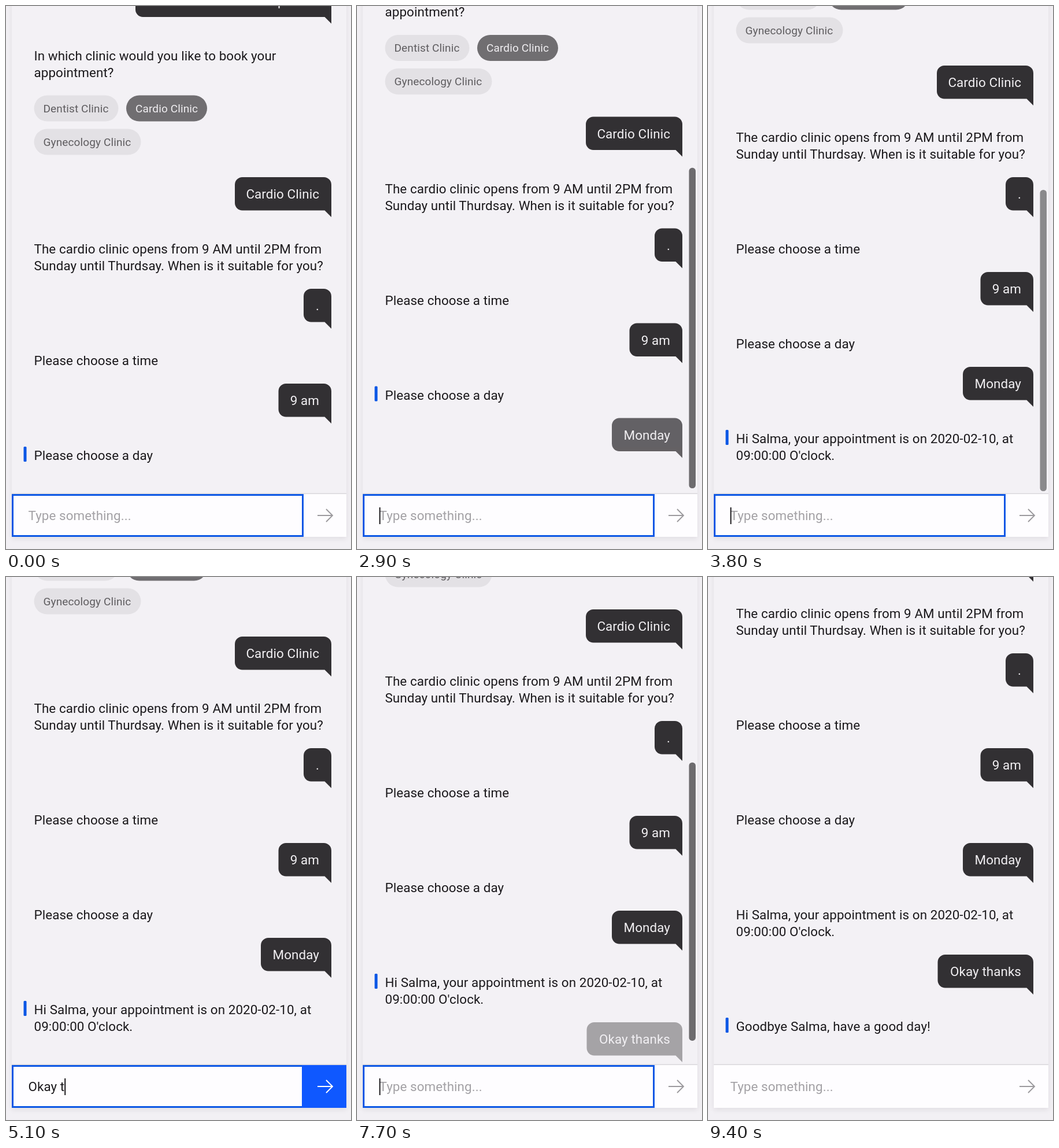
An HTML page for the animation above (10000 ms loop, 597 by 939 pixels).

```html
<!DOCTYPE html>
<html lang="en">
<head>
<meta charset="utf-8">
<title>Clinic chat</title>
<style>
  html, body { margin: 0; width: 100%; height: 100%; overflow: hidden; background: #f2f0f4; }
  .panel { position: absolute; left: 10px; top: -30px; width: 579px; height: 948px;
    background: #f3f1f5; box-shadow: 0 3px 9px rgba(40, 36, 46, .09); }
  svg { position: absolute; left: 0; top: 0; display: block; }
  text { font: 22.4px Roboto, sans-serif; letter-spacing: .08px; fill: #1b191c; white-space: pre; }
  .said { fill: #f1eff2; }
  .chip { font-size: 19px; letter-spacing: .12px; fill: #5f5d60; }
  .chip.on { fill: #f1eff2; }
  .hint { fill: #a3a1a5; }
</style>
</head>
<body>
<div class="panel"></div>
<svg id="stage" width="597" height="939" viewBox="0 0 597 939">
  <defs><clipPath id="view"><rect x="10" y="0" width="579" height="843"/></clipPath></defs>
  <g clip-path="url(#view)">
    <g id="log"></g>
    <rect id="thumb" x="574.5" width="11.5" rx="5.5" fill="#6d6b6e"/>
  </g>
  <rect x="10" y="844" width="579" height="74" fill="#fefdff"/>
  <rect x="10" y="842.5" width="579" height="1.5" fill="#dad8dc"/>
  <rect id="focus" x="11.5" y="845.5" width="502" height="71" fill="none" stroke="#0b57e5" stroke-width="3"/>
  <rect id="send" x="512" y="844" width="77" height="74" fill="#0f58ff"/>
  <path id="arrow" d="M539 881H565M554 870L565 881L554 892" fill="none" stroke-width="1.9"/>
  <text id="hint" class="hint" x="38.5" y="889">Type something...</text>
  <text id="typed" x="38.5" y="889"></text>
  <rect id="caret" y="867" width="2" height="29" fill="#1b191c"/>
</svg>
<script>
const LOOP = 10000, STEP = 100;
const $ = id => document.getElementById(id);
const log = $('log');

function add(tag, attrs, parent = log, content = '') {
  const el = document.createElementNS('http://www.w3.org/2000/svg', tag);
  for (const k in attrs) el.setAttribute(k, attrs[k]);
  el.textContent = content;
  parent.append(el);
  return el;
}

// Bot message: y is the first baseline
function reply(y, ...lines) {
  const g = add('g', {});
  lines.forEach((line, i) => add('text', { x: 48.5, y: y + i * 29 }, g, line));
  return g;
}

// User message with a tail at the lower right
function bubble(x, y, line) {
  const g = add('g', {});
  add('path', {
    d: `M${x + 13} ${y}H550a13 13 0 0 1 13 13V${y + 69}L551.5 ${y + 57.5}H${x + 13}` +
       `a13 13 0 0 1 -13 -13V${y + 13}a13 13 0 0 1 13 -13Z`,
    fill: '#323033'
  }, g);
  add('text', { x: 542, y: y + 37, class: 'said', 'text-anchor': 'end' }, g, line);
  return g;
}

function chip(x, y, width, label, on) {
  add('rect', { x, y, width, height: 45, rx: 22.5, fill: on ? '#706e71' : '#e3e1e5' });
  add('text', { x: x + 16, y: y + 29, class: on ? 'chip on' : 'chip' }, log, label);
}

const marker = y => add('rect', { x: 30.5, y, width: 5, height: 26, rx: 1.5, fill: '#0b57e5' });

bubble(224, -38.5, 'I need to see a doctor please.');
reply(93.5, 'In which clinic would you like to book your', 'appointment?');
chip(48.5, 154.5, 146, 'Dentist Clinic');
chip(208, 154.5, 140, 'Cardio Clinic', true);
chip(48.5, 212.5, 185, 'Gynecology Clinic');
bubble(396, 296, 'Cardio Clinic');
reply(428, 'The cardio clinic opens from 9 AM until 2PM from',
  'Sunday until Thurdsay. When is it suitable for you?');
bubble(515, 489, '.');
reply(621, 'Please choose a time');
bubble(471.5, 653, '9 am');
reply(785, 'Please choose a day');
const day = bubble(441, 817, 'Monday');
const booked = reply(949, 'Hi Salma, your appointment is on 2020-02-10, at', "09:00:00 O'clock.");
const thanks = bubble(397.5, 1010, 'Okay thanks');
const bye = reply(1142, 'Goodbye Salma, have a good day!');
const bars = [762, 926, 1119].map(marker);

// Step tables: [time, value]
const TYPED = [[0, ''], [1100, 'M'], [1300, 'Mo'], [1500, 'Mon'], [1700, 'Mond'], [1900, 'Monday'],
  [2800, ''], [4000, 'O'], [4200, 'Ok'], [4400, 'Oka'], [4600, 'Okay'], [4800, 'Okay '],
  [5100, 'Okay t'], [5400, 'Okay th'], [5800, 'Okay tha'], [6000, 'Okay than'],
  [6200, 'Okay thank'], [6400, 'Okay thanks'], [6500, 'Okay thanks '], [7700, '']];
const CARET = [[0, 0], [300, 1], [800, 0], [1100, 1], [2400, 0], [2800, 1], [3300, 0], [3800, 1],
  [6800, 0], [7200, 1], [7700, 1], [8200, 0], [8700, 1], [9200, 0]];

// Ramps: linear between the points
const SCROLL = [[2700, 0], [2800, 50], [2900, 104.5], [3000, 112], [3100, 112], [3200, 160],
  [3300, 193], [7600, 193], [7700, 240], [7800, 297.5], [7900, 335], [8000, 357]];
const THUMB = [[2700, 0], [2800, 1], [3700, 1], [4150, 0], [7600, 0], [7700, 1], [8400, 1], [8850, 0]];

function held(table, t) {
  let value = table[0][1];
  for (const [at, v] of table) if (t >= at) value = v;
  return value;
}

function ramp(points, t) {
  let [t0, v0] = points[0];
  for (const [t1, v1] of points) {
    if (t < t1) return t1 > t0 ? v0 + (v1 - v0) * (t - t0) / (t1 - t0) : v0;
    [t0, v0] = [t1, v1];
  }
  return v0;
}

const fade = (t, from, ms) => Math.max(0, Math.min(1, (t - from) / ms));
const set = (el, name, value) => el.setAttribute(name, value);
const show = (el, opacity) => set(el, 'opacity', opacity);

function draw(now) {
  const t = Math.floor(now % LOOP / STEP) * STEP;
  const scroll = ramp(SCROLL, t);
  const bookedIn = fade(t, 3100, 300), byeIn = fade(t, 7800, 300);

  set(log, 'transform', `translate(0 ${-scroll})`);
  show(day, fade(t, 2640, 350));
  show(booked, bookedIn);
  show(thanks, fade(t, 7600, 250));
  show(bye, byeIn);
  show(bars[0], bookedIn ? 0 : 1);
  show(bars[1], byeIn ? 0 : bookedIn);
  show(bars[2], byeIn);

  // Scrollbar thumb follows the content height
  const height = 1158 + (t >= 2800 && 112) + (t >= 3100 && 81) + (t >= 7700 && 112) + (t >= 7900 && 52);
  set(thumb, 'y', 4 + 835 * (315 + scroll) / height);
  set(thumb, 'height', 835 * 843 / height);
  show(thumb, ramp(THUMB, t));

  const value = held(TYPED, t);
  typed.textContent = value;
  show(hint, value ? 0 : 1);
  const filled = t < 2800 ? fade(t, 1050, 100) : value ? fade(t, 3950, 100) : 0;
  show(send, filled);
  set(arrow, 'stroke', filled ? '#fff' : '#9c9a9e');
  show(focus, t < 9400 ? 1 : 0);
  set(caret, 'x', 38.5 + (value ? typed.getComputedTextLength() : 0));
  show(caret, held(CARET, t));
}

const thumb = $('thumb'), typed = $('typed'), hint = $('hint'), send = $('send'),
  arrow = $('arrow'), focus = $('focus'), caret = $('caret');
const start = performance.now();
function tick() {
  draw(performance.now() - start);
  requestAnimationFrame(tick);
}
tick();
</script>
</body>
</html>
```
